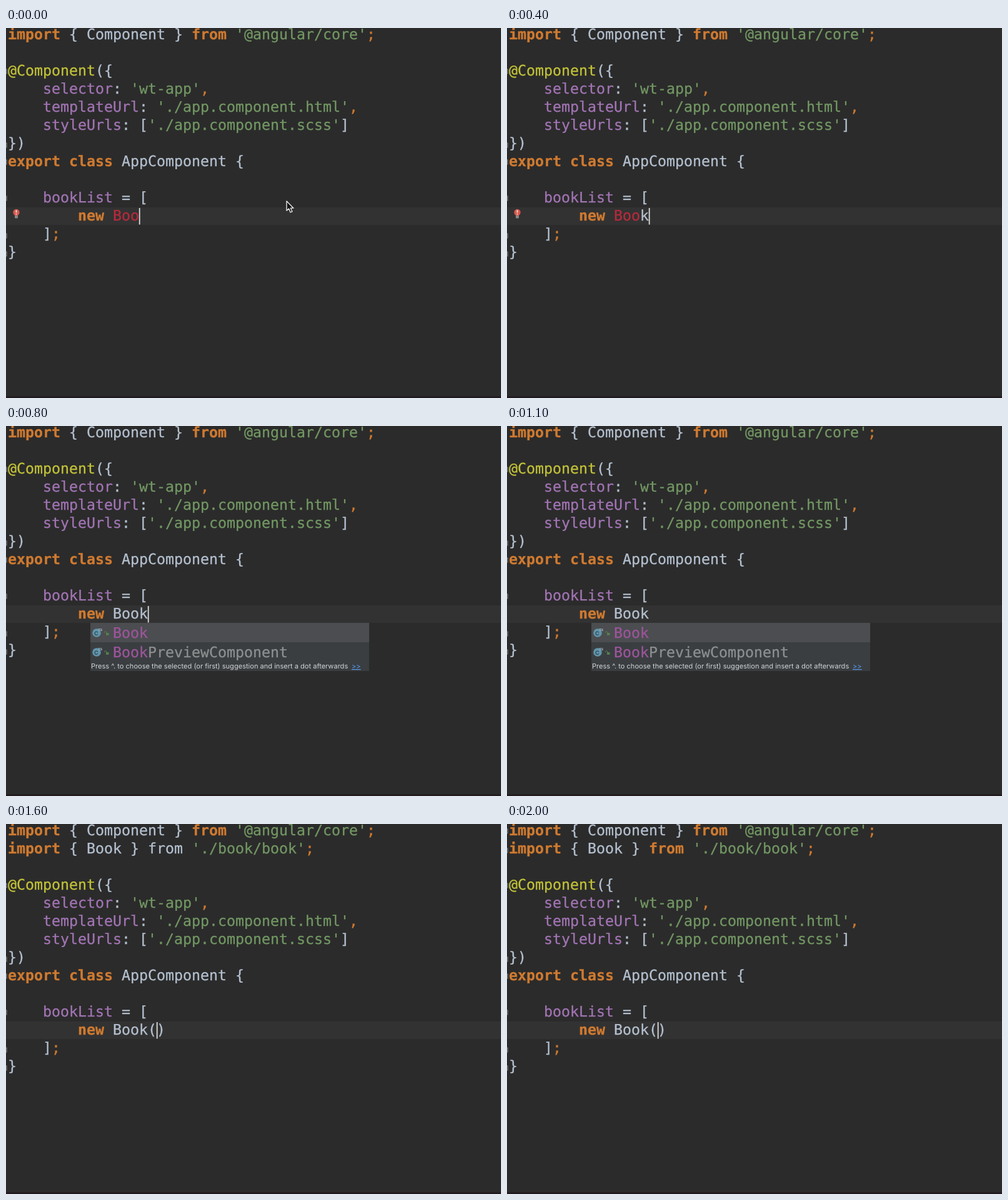
An HTML page that plays this animation: 792x592 px, repeating every 2.1 s.

```html
<!DOCTYPE html>
<html lang="en">
<head>
<meta charset="utf-8">
<title>Auto import while typing</title>
<style>
  html, body { margin: 0; width: 100%; height: 100%; overflow: hidden; background: #2b2b2b; }
  svg { display: block; width: 792px; height: 592px; }
  text { white-space: pre; text-rendering: geometricPrecision; }
  .code {
    font: 23.254px "DejaVu Sans Mono", monospace;
    color: #b4c0cf; fill: currentColor; stroke: currentColor; stroke-width: .3;
  }
  .kw { font-weight: bold; color: #cf7a30; }
  .punct { color: #cf7a30; }
  .str { color: #729763; }
  .prop { color: #a274b4; }
  .deco { color: #c2c238; }
  .err { color: #b62b3c; }
  .match { color: #9d559b; }
  .rest { color: #8d8f90; }
  .fold { fill: none; stroke: #858585; stroke-width: 1.2; }
  .hint { font: 11.07px Inter, sans-serif; fill: #d0d2d4; }
  .link { fill: #589df6; text-decoration: underline; }
  .tiny { font: bold 5px Inter, sans-serif; fill: #b9d3df; }
  .letter { font: bold 9px Inter, sans-serif; fill: #2f4a57; text-anchor: middle; }
</style>
</head>
<body>
<svg viewBox="0 0 792 592">
  <rect width="792" height="592" fill="#2b2b2b"/>
  <rect y="589.5" width="792" height="2.5" fill="#211a1e"/>
  <g id="head"></g>
  <g id="body">
    <rect y="287" width="792" height="28" fill="#323232"/>
  </g>
  <g id="bulb">
    <rect x="14" y="299" width="5" height="5.5" rx="1" fill="#8b8583"/>
    <circle cx="16.5" cy="295" r="5.2" fill="#d4594f"/>
    <path d="M16.5 291.5v4M16.5 297v1.6" stroke="#f6e6e2" stroke-width="1.7"/>
  </g>
  <rect id="caret" width="1.8" height="26.5" fill="#dcdcdc"/>
  <g id="popup">
    <rect x="135" y="315" width="446" height="77" fill="#3a3e41"/>
    <rect x="135" y="315" width="446" height="31" fill="#4b4d50"/>
    <text class="hint" x="136" y="388">Press ^. to choose the selected (or first) suggestion and insert a dot afterwards</text>
    <text class="hint link" x="553" y="388">&gt;&gt;</text>
  </g>
  <path id="pointer" d="M449 277v15.2l3.5-3.2 2.6 6 2.9-1.3-2.6-5.5h4.6z"
        fill="#151515" stroke="#f2f2f2" stroke-width="1.3" stroke-linejoin="round"/>
</svg>
<script>
const LOOP = 2100, LEFT = 3.1, CELL = 14, LINE = 29, BASE = 18.4;
const TYPED = 200, RESOLVED = 700, SUGGEST = 800, BLINK = 1100, INSERTED = 1600, CHECKED = 1900;
const $ = id => document.getElementById(id);
const timed = [];

function add(parent, name, attrs, content = '') {
  const el = document.createElementNS('http://www.w3.org/2000/svg', name);
  for (const key in attrs) el.setAttribute(key, attrs[key]);
  el.textContent = content;
  parent.append(el);
  return el;
}
const show = (el, from, to = LOOP) => timed.push([el, from, to]);
const code = (parent, y, col, kind, text) =>
  add(parent, 'text', { class: 'code ' + kind, x: LEFT + col * CELL, y }, text);

// Takes alternating kinds and texts, laid out on the character grid.
function line(parent, row, col, ...parts) {
  for (let i = 0; i < parts.length; i += 2) {
    code(parent, BASE + row * LINE, col, parts[i], parts[i + 1]);
    col += parts[i + 1].length;
  }
}
const fold = (parent, row, closing) => add(parent, 'path', {
  class: 'fold',
  d: `M-2 ${row * LINE + (closing ? 10 : 8)}h3v7h-3`
});

const head = $('head'), body = $('body');
line(head, 0, 0, 'kw', 'import', '', ' { Component } ', 'kw', 'from', 'str', " '@angular/core'", 'punct', ';');

const added = add(head, 'g', {});
line(added, 1, 0, 'kw', 'import', '', ' { Book } ');
line(added, 1, 20, 'str', " './book/book'", 'punct', ';');
show(added, INSERTED);
show(code(head, BASE + LINE, 16, '', 'from'), INSERTED, CHECKED);
show(code(head, BASE + LINE, 16, 'kw', 'from'), CHECKED);
show(fold(head, 0), CHECKED);
show(fold(head, 1, true), CHECKED);

line(body, 2, 0, 'deco', '@Component', '', '({');
line(body, 3, 4, 'prop', 'selector', '', ': ', 'str', "'wt-app'", 'punct', ',');
line(body, 4, 4, 'prop', 'templateUrl', '', ': ', 'str', "'./app.component.html'", 'punct', ',');
line(body, 5, 4, 'prop', 'styleUrls', '', ': [', 'str', "'./app.component.scss'", '', ']');
line(body, 6, 0, '', '})');
line(body, 7, 0, 'kw', 'export class', '', ' AppComponent {');
line(body, 9, 4, 'prop', 'bookList', '', ' = [');
line(body, 10, 8, 'kw', 'new');
line(body, 11, 4, '', ']', 'punct', ';');
line(body, 12, 0, '', '}');
[2, 7, 9].forEach(row => fold(body, row));
[6, 11, 12].forEach(row => fold(body, row, true));

const editY = BASE + 10 * LINE;
show(code(body, editY, 12, 'err', 'Boo'), 0, RESOLVED);
show(code(body, editY, 12, '', 'Boo'), RESOLVED);
show(code(body, editY, 15, '', 'k'), TYPED);
show(code(body, editY, 16, '', '()'), INSERTED);

const popup = $('popup');
[[331, ''], [362, 'PreviewComponent']].forEach(([y, rest]) => {
  add(popup, 'circle', { cx: 145, cy: y, r: 6.8, fill: '#6295ab' });
  add(popup, 'text', { class: 'letter', x: 144.3, y: y + 3.8 }, 'C');
  add(popup, 'text', { class: 'tiny', x: 147.5, y: y - 3 }, 'TS');
  add(popup, 'path', { d: `M157.5 ${y}v-1.5q1.5-2 3 0v1.5`, fill: 'none', stroke: '#55804d' });
  add(popup, 'rect', { x: 160, y, width: 4.5, height: 3.8, fill: '#55804d' });
  code(popup, y + 7.6, 12, 'match', 'Book');
  code(popup, y + 7.6, 16, 'rest', rest);
});

show($('bulb'), 0, RESOLVED);
show($('pointer'), 0, TYPED);
show(popup, SUGGEST, INSERTED);

function draw() {
  const t = performance.now() % LOOP;
  for (const [el, from, to] of timed)
    el.setAttribute('visibility', t >= from && t < to ? 'visible' : 'hidden');

  const shift = t >= INSERTED ? LINE : 0;
  body.setAttribute('transform', `translate(0 ${shift})`);

  const col = t < TYPED ? 15 : t < INSERTED ? 16 : 17;
  const caret = $('caret');
  caret.setAttribute('x', LEFT + col * CELL - 0.3);
  caret.setAttribute('y', 288 + shift);
  caret.setAttribute('visibility', t >= BLINK && t < INSERTED ? 'hidden' : 'visible');
  requestAnimationFrame(draw);
}
draw();
</script>
</body>
</html>
```
